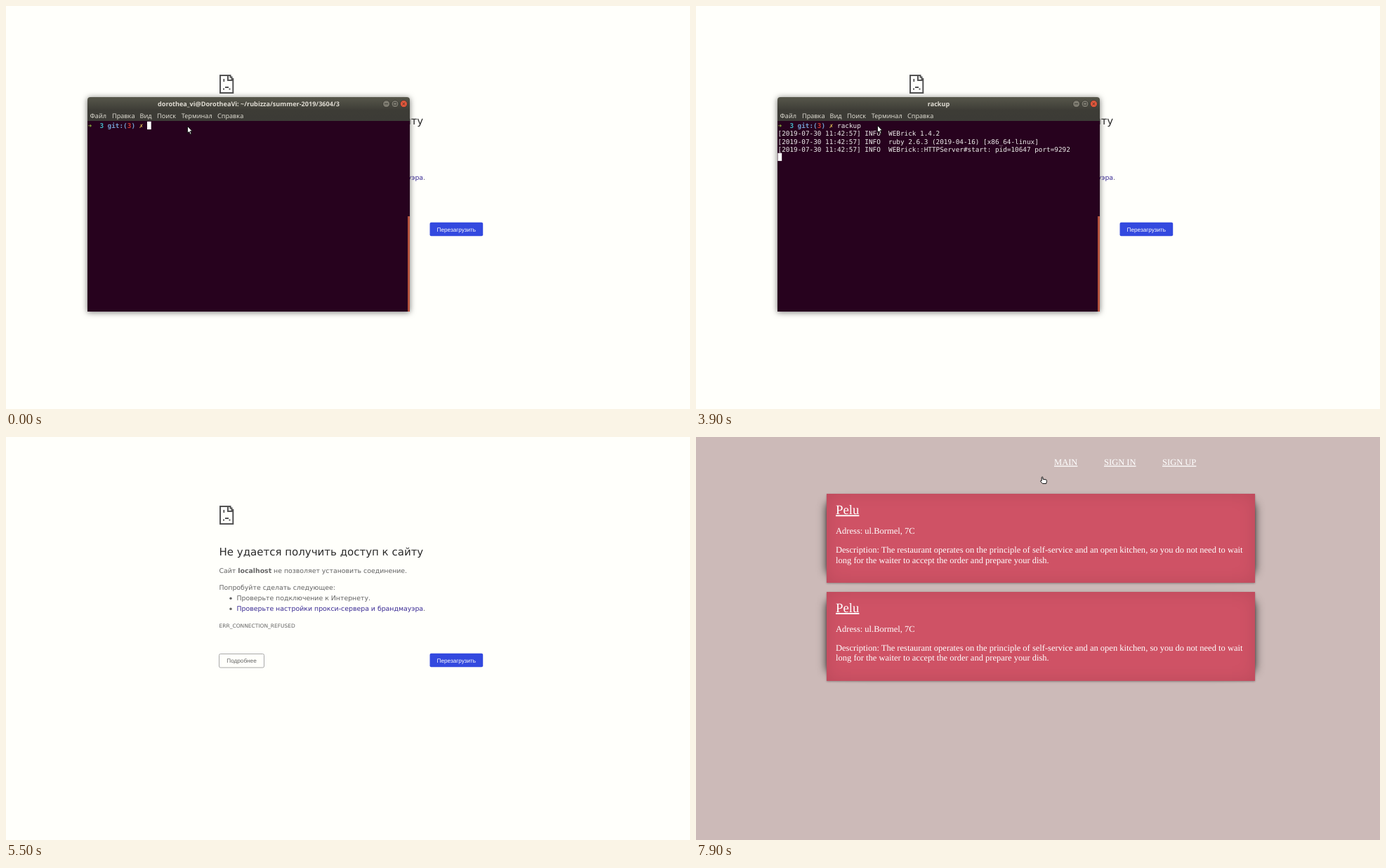
Write an HTML page that moves like this. It is 974 px wide and 575 px high and loops after 8000 ms.

```html
<!DOCTYPE html>
<html lang="ru">
<head>
<meta charset="utf-8">
<style>
  html, body { margin: 0; width: 974px; height: 575px; overflow: hidden; background: #fffffb; }
  .scene, svg { position: absolute; left: 0; top: 0; width: 974px; height: 575px; }
  .scene { isolation: isolate; }
  text { white-space: pre; text-rendering: geometricPrecision; }

  #error text { font: 9.375px "DejaVu Sans", sans-serif; fill: #646464; }
  #error .title { font-size: 15px; fill: #2b2b2b; }
  #error .link { fill: #3a2b94; }
  #error .code { font-size: 7.5px; }
  #error .button { font: 8.2px "Liberation Sans", sans-serif; text-anchor: middle; }

  #window { position: absolute; left: 116px; top: 130px; width: 459px; height: 306px;
    border-radius: 4px 4px 0 0; box-shadow: 0 1px 9px rgba(0, 0, 0, .55);
    background: linear-gradient(#57574b, #3d3c36 19px, #3c3b36 34px, #27021e 34px); }
  #terminal text { font: 9.35px "DejaVu Sans Mono", monospace; fill: #eeeeec; }
  #terminal .menu text { font: 9.1px "Noto Sans", sans-serif; fill: #dcd9cf; }
  #terminal #title { font: bold 9.1px "Noto Sans", sans-serif; fill: #dfdbd2; text-anchor: middle; }
  #terminal .prompt { font-weight: bold; }

  #site { background: #ccbab8; }
  .card { position: absolute; left: 186px; width: 610px; height: 127px; background: #cf5265;
    box-shadow: 0 .6px 2.5px rgba(0, 0, 0, .3), inset 0 0 25px rgba(0, 0, 0, .1); }
  .card::before { content: ""; position: absolute; z-index: -1; inset: 10px 0;
    border-radius: 62px / 6px; box-shadow: 0 0 12.5px rgba(0, 0, 0, .8); }
  #site text { font: 12.52px "Liberation Serif", serif; fill: #fff; }
  #site .name { font-size: 18.78px; }
  #site .name, #site .nav { text-decoration: underline; }
</style>
</head>
<body>
<div class="scene" id="error">
  <svg>
    <g fill="none" stroke="#535353" stroke-width="2">
      <path d="M317 99H305V124H323.3V106H316V99H319.5V101.5H321.5V104H323.3V106"/>
      <path d="M310.3 104V108M312 116H317M309 118.5H311M317.5 118.5H319.5" stroke-width="1.8"/>
    </g>
    <text class="title" x="303.5" y="168.7">Не удается получить доступ к сайту</text>
    <text x="303.5" y="193.5">Сайт <tspan font-weight="bold">localhost</tspan> не позволяет установить соединение.</text>
    <text x="303.5" y="218">Попробуйте сделать следующее:</text>
    <g fill="#646464"><circle cx="320" cy="230.3" r="1.7"/><circle cx="320" cy="245.3" r="1.7"/></g>
    <text x="328.5" y="233">Проверьте подключение к Интернету.</text>
    <text class="link" x="328.5" y="248">Проверьте настройки прокси-сервера и брандмауэра<tspan fill="#646464">.</tspan></text>
    <text class="code" x="303.5" y="271.8">ERR_CONNECTION_REFUSED</text>
    <rect x="303.5" y="309.5" width="64" height="19.5" rx="2" fill="none" stroke="#a8a8a8"/>
    <text class="button" x="335.5" y="322">Подробнее</text>
    <rect x="603.5" y="308.8" width="75.7" height="19.4" rx="2" fill="#3349df"/>
    <text class="button" x="641.3" y="321.6" style="fill:#fff">Перезагрузить</text>
  </svg>
</div>

<div class="scene" id="terminal">
  <div id="window"></div>
  <svg>
    <text id="title" x="345.5" y="142.9"></text>
    <g fill="#7d7b70" stroke="#33322d" stroke-width=".8">
      <circle cx="541.6" cy="139.6" r="5"/><path d="M539.2 139.6h4.8"/>
      <circle cx="554" cy="139.6" r="5"/><path d="M551.9 137.5h4.2v4.2h-4.2z"/>
      <circle cx="566.4" cy="139.6" r="5" fill="#e2573b"/><path d="M564.6 137.8l3.6 3.6m0-3.6l-3.6 3.6"/>
    </g>
    <g class="menu">
      <text x="119.5" y="160.4">Файл</text><text x="151" y="160.4">Правка</text>
      <text x="190.5" y="160.4">Вид</text><text x="215" y="160.4">Поиск</text>
      <text x="249.8" y="160.4">Терминал</text><text x="301" y="160.4">Справка</text>
    </g>
    <text class="prompt" y="174.2"><tspan x="116.5" fill="#8ab53c">➜</tspan><tspan x="133.4" fill="#42b7c6">3</tspan><tspan x="144.6" fill="#739fcf">git:(</tspan><tspan x="172.8" fill="#cc3a33">3</tspan><tspan x="178.4" fill="#739fcf">)</tspan><tspan x="189.7" fill="#e6c558">✗</tspan></text>
    <text id="command" x="201" y="174.2"></text>
    <g id="log">
      <text x="116.5" y="185.4">[2019-07-30 11:42:57] INFO  WEBrick 1.4.2</text>
      <text x="116.5" y="196.7">[2019-07-30 11:42:57] INFO  ruby 2.6.3 (2019-04-16) [x86_64-linux]</text>
      <text x="116.5" y="207.9">[2019-07-30 11:42:57] INFO  WEBrick::HTTPServer#start: pid=10647 port=9292</text>
    </g>
    <rect id="caret" width="5.7" height="11.3" fill="#fff"/>
    <rect x="572" y="300" width="3" height="136" fill="#b5533f"/>
  </svg>
</div>

<div class="scene" id="site">
  <div class="card" style="top:81px"></div>
  <div class="card" style="top:220.7px"></div>
  <svg>
    <text class="nav" x="510" y="40">MAIN</text>
    <text class="nav" x="581" y="40">SIGN IN</text>
    <text class="nav" x="664" y="40">SIGN UP</text>
    <g id="entry">
      <text class="name" x="199" y="110.3">Pelu</text>
      <text x="199" y="138.3">Adress: ul.Bormel, 7C</text>
      <text x="199" y="165.3">Description: The restaurant operates on the principle of self-service and an open kitchen, so you do not need to wait</text>
      <text x="199" y="179.7">long for the waiter to accept the order and prepare your dish.</text>
    </g>
    <use href="#entry" y="139.7"/>
  </svg>
</div>

<svg>
  <g id="pointer" fill="#fff" stroke="#111" stroke-linejoin="round">
    <path id="arrow" d="M.5 .5V10.3L2.7 8.3 4.5 12.2 6.1 11.5 4.4 7.7H7.3Z"/>
    <path id="hand" d="M2.2 6.5V1.5Q3.1 0 4 1.5V4.2L8 4.8Q9.5 5 9.5 6.5L8.7 10.5H3.5L.6 7.3Q.5 5.8 2.2 6.5Z"/>
  </g>
</svg>

<script>
const LOOP = 8000, CELL = 5.63, ROW = 11.25;
const $ = id => document.getElementById(id);
const show = (id, on) => $(id).style.display = on ? "" : "none";
const latest = (steps, t) => steps.findLast(step => step[0] <= t);

// [time, command line, caret visible]
const typing = [
  [0, "", true], [100, "ruby app.rb", false], [600, "clear", true],
  [900, "cd ..", true], [1200, "cd ..", false], [1300, "cd ..", true],
  [1500, "exit", true], [1900, "exit", false], [2500, "ls", true],
  [3000, "rackup", true], [3100, "rackup", false], [3300, "rackup", true]
];

// [time, x, y]; no position means the pointer is hidden
const stops = [
  [0, 258, 171], [100], [3900, 258, 170], [4700, 191, 43], [4800, 189, 42.5],
  [5300, 185, 38], [5500], [7400, 258, 69], [7700, 345, 101], [7800, 440, 88], [7900, 490, 56]
];

function pointerAt(t) {
  if (t < 3900 || t >= 4700) return latest(stops, t);
  const k = (t - 3900) / 800, ease = k * k * (3 - 2 * k);
  return [t, 258 - 67 * ease, 170 - 127 * ease];
}

function draw(now) {
  const t = Math.floor(now % LOOP / 100) * 100;
  show("error", t < 6500);
  show("terminal", t < 5000);
  show("site", t >= 6600);

  const [, command, caretOn] = latest(typing, t);
  const running = t >= 3500, logged = t >= 3900;
  $("title").textContent = running ? "rackup" : "dorothea_vi@DorotheaVi: ~/rubizza/summer-2019/3604/3";
  $("command").textContent = command;
  show("log", logged);
  show("caret", caretOn);
  $("caret").setAttribute("x", running ? 116.5 : 201 + command.length * CELL);
  $("caret").setAttribute("y", 164.8 + ROW * (logged ? 4 : running ? 1 : 0));

  const [, x, y] = pointerAt(t);
  show("pointer", x !== undefined);
  show("arrow", t < 7900);
  show("hand", t >= 7900);
  if (x !== undefined) $("pointer").setAttribute("transform", `translate(${x} ${y})`);
  requestAnimationFrame(draw);
}
requestAnimationFrame(draw);
</script>
</body>
</html>
```
